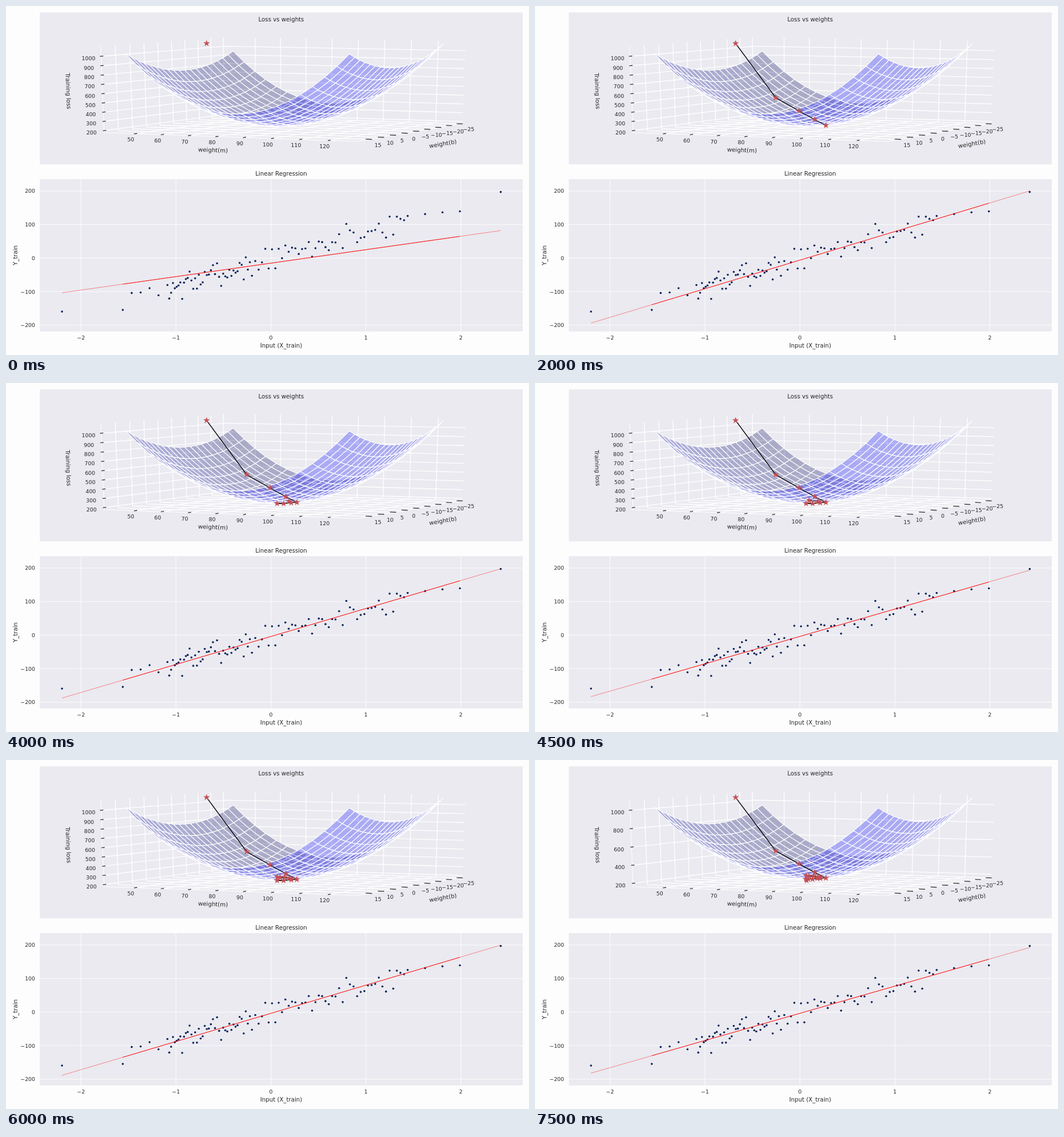
Write an HTML page that moves like this. It is 917 px wide and 611 px high and loops after 8000 ms.

```html
<!DOCTYPE html>
<html lang="en">
<head>
<meta charset="utf-8">
<title>Gradient descent</title>
<style>
  html, body { margin: 0; width: 100%; height: 100%; overflow: hidden; background: #fdfdfd; }
  svg { display: block; width: 917px; height: 611px; }
  text { font-family: "DejaVu Sans", Verdana, sans-serif; fill: #262626; }
</style>
</head>
<body>
<svg id="stage" viewBox="0 0 917 611"></svg>
<script>
const NS = 'http://www.w3.org/2000/svg';
const stage = document.getElementById('stage');
const STEP = 500, STEPS = 16;
const TITLE = 10.2, TICK = 9.35;
const PANEL = '#eaeaf0', INK = '#262626';

function add(parent, tag, attrs = {}) {
  const el = document.createElementNS(NS, tag);
  for (const k in attrs) el.setAttribute(k, attrs[k]);
  parent.appendChild(el);
  return el;
}
function label(parent, str, x, y, size, anchor = 'middle', angle = 0) {
  const el = add(parent, 'text', { 'font-size': size, 'text-anchor': anchor, y: size * 0.365,
    transform: `translate(${x} ${y}) rotate(${angle})` });
  el.textContent = String(str).replace('-', '\u2212');
}
const range = (a, b, d = 1) => Array.from({ length: Math.round((b - a) / d) + 1 }, (_, i) => a + i * d);
const pts = list => list.map(p => p.map(v => v.toFixed(2)).join(',')).join(' ');
const line = (parent, list, stroke, width) =>
  add(parent, 'polyline', { points: pts(list), fill: 'none', stroke, 'stroke-width': width });

// Camera: 25 degrees around, 10 degrees up, 10 units from a unit cube.
const AZ = 25 * Math.PI / 180, EL = 10 * Math.PI / 180;
const [ca, sa, ce, se] = [Math.cos(AZ), Math.sin(AZ), Math.cos(EL), Math.sin(EL)];
const depth = (b, m, z) => ce * (ca * b + sa * m) + se * z;
function project(b, m, z) {
  const d = 10 - depth(b, m, z);
  const right = -sa * b + ca * m;
  const up = -se * (ca * b + sa * m) + ce * z;
  return [494 + 4578 * right / d, 140.4 - 1437.8 * up / d];
}

const E = 0.5 + 1 / 48;                 // box edge
const HALF = 0.4545;                    // half width of the surface
const unitM = m => (m - 84.2) / 88;
const unitB = b => (b + 3) / 44;

// Bowl over v (slope) and w (intercept), both -1..1.
const bowl = (v, w) => -0.5 + 0.7135 * v * v + 0.2245 * w * w + 0.0474 * v + 0.0166 * w - 0.0244 * v * w;
function faceColour(v, w) {
  const zm = 22.3 * (1.427 * v + 0.0474 - 0.0244 * w);
  const zb = 44.6 * (0.449 * w + 0.0166 - 0.0244 * v);
  const s = (zm + zb + 0.5) / (1.5 * Math.hypot(zm, zb, 1));
  const k = Math.min(1, Math.max(0, (s + 0.94) / 1.88));
  return `rgb(0,0,${Math.round(255 * (0.35 + 0.65 * k))})`;
}

function drawScene(zTop, zSpan, zStep, squash) {
  const g = add(stage, 'g');
  const unitZ = z => 0.5 - (zTop - z) / zSpan;
  const path = (list, width = 1.35, stroke = '#fff') =>
    line(g, list.map(p => project(...p)), stroke, width);
  const ms = range(50, 120, 10), bs = range(-25, 15, 5), zs = range(200, 1000, zStep);
  const out = E + 0.1 / 12, inn = E - 0.2 / 12;

  ms.map(unitM).forEach(m => path([[E, m, -E], [-E, m, -E], [-E, m, E]]));
  bs.map(unitB).forEach(b => path([[b, E, -E], [b, -E, -E], [b, -E, E]]));
  zs.map(unitZ).forEach(z => path([[E, -E, z], [-E, -E, z], [-E, E, z]]));
  path([[E, -E, E], [E, -E, -E], [E, E, -E], [-E, E, -E]], 1.05);

  function mark(value, at, from, to, dx, dy) {
    const [x, y] = project(...at);
    path([from, to], 1.25, INK);
    label(g, value, x + dx, y + dy, TICK);
  }
  ms.forEach(v => {
    const m = unitM(v);
    mark(v, [E, m, -E], [out, m, -E], [inn, m, -E], -7.5, 10.3);
  });
  bs.forEach(v => {
    const b = unitB(v);
    mark(v, [b, E, -E], [b, out, -E], [b, inn, -E], 14.2, 9.7);
  });
  zs.forEach(v => {
    const z = unitZ(v);
    mark(v, [E, -E, z], [out, -E, z], [inn, -E, z], -22, 3.8);
  });

  const N = 19, faces = [];
  const at = i => 2 * i / N - 1;
  const corner = (i, j) => {
    const v = at(i), w = at(j);
    return [w * HALF, v * HALF, 0.5 - (0.5 - bowl(v, w)) * squash];
  };
  for (let i = 0; i < N; i++) for (let j = 0; j < N; j++) {
    const c = [corner(i, j), corner(i + 1, j), corner(i + 1, j + 1), corner(i, j + 1)];
    faces.push({
      points: pts(c.map(p => project(...p))),
      near: c.reduce((s, p) => s + depth(...p), 0),
      fill: faceColour(at(i + 0.5), at(j + 0.5))
    });
  }
  faces.sort((a, b) => a.near - b.near).forEach(f => add(g, 'polygon', {
    points: f.points, fill: f.fill, 'fill-opacity': 0.27,
    stroke: '#fff', 'stroke-width': 1.1, 'stroke-linejoin': 'round' }));
  return g;
}

// Upper chart
add(stage, 'rect', { x: 59.3, y: 11.3, width: 846.7, height: 266, fill: PANEL });
const scenes = [drawScene(1086.5, 891, 100, 1), drawScene(1087.5, 906, 200, 0.984)];
label(stage, 'Loss vs weights', 482.5, 23.5, TITLE);
label(stage, 'weight(m)', 363, 252, TITLE, 'middle', 2);
label(stage, 'weight(b)', 766, 241, TITLE, 'middle', -9.8);
label(stage, 'Training loss', 109.5, 149, TITLE, 'middle', 87.7);
const trail = add(stage, 'g');

// Lower chart
add(stage, 'rect', { x: 59.3, y: 303.2, width: 846.7, height: 266.5, fill: PANEL });
const px = x => 464.5 + 166.5 * x, py = y => 441.4 - 0.587 * y;
range(-2, 2).forEach(v => {
  line(stage, [[px(v), 303.2], [px(v), 569.7]], '#fff', 0.9);
  label(stage, v, px(v), 580.5, TICK);
});
range(-200, 200, 100).forEach(v => {
  line(stage, [[59.3, py(v)], [906, py(v)]], '#fff', 0.9);
  label(stage, v, 51, py(v), TICK, 'end');
});
label(stage, 'Linear Regression', 482.5, 293.7, TITLE);
label(stage, 'Input (X_train)', 482.5, 594, TITLE);
label(stage, 'Y_train', 16, 436.5, TITLE, 'middle', -90);

// Samples: inputs follow a few quantiles, outputs scatter around a line.
let seed = 7;
function random() {
  seed = (seed * 1664525 + 1013904223) % 4294967296;
  return seed / 4294967296;
}
const gauss = () => (random() + random() + random() + random() - 2) * Math.sqrt(3);
const quantiles = [[0, -2.2], [1, -1.56], [6, -1.09], [24, -0.74], [49, -0.2],
  [74, 0.68], [94, 1.44], [97, 1.99], [98, 2.42]];
function inputAt(i) {
  const n = Math.max(1, quantiles.findIndex(q => q[0] >= i));
  const [[i0, x0], [i1, x1]] = [quantiles[n - 1], quantiles[n]];
  return x0 + (x1 - x0) * (i - i0) / (i1 - i0);
}
range(0, 98).forEach(i => {
  const x = inputAt(i);
  add(stage, 'circle', { cx: px(x), cy: py(82 * x - 3 + 20 * gauss()), r: 1.8, fill: '#0a2259' });
});
const fitThin = line(stage, [], '#f00', 0.45);
const fitBold = line(stage, [], '#f00', 0.85);

// The fall into the bowl (star x, star y, slope), then a wobble around its bottom.
const fall = [[351.7, 65.5, 40.15], [422, 160.5, 58.2], [463, 183.7, 73.1], [490.5, 199, 79.3], [510, 209, 85.3]];
const wave = (k, peak, period) => Math.cos(2 * Math.PI * (k - peak) / period);
function stateAt(k) {
  if (k < fall.length) return fall[k];
  const swing = 13 * wave(k, 12.2, 4.9);
  return [488 + swing, 208 + 3.2 * wave(k, 14.5, 9), 82.5 + 0.12 * swing];
}
const interceptAt = k => -3.5 - 11.5 * 0.68 ** k;

function star(x, y) {
  const list = range(0, 9).map(i => {
    const r = i % 2 ? 1.9 : 5, a = i * Math.PI / 5;
    return [x + r * Math.sin(a), y - r * Math.cos(a)];
  });
  add(trail, 'polygon', { points: pts(list), fill: '#c44e52', stroke: '#c44e52', 'stroke-width': 0.8 });
}

function show(step) {
  const last = step === STEPS - 1;
  scenes[0].setAttribute('display', last ? 'none' : 'inline');
  scenes[1].setAttribute('display', last ? 'inline' : 'none');
  const top = fall[0][1];
  const stars = range(0, step).map(k => {
    const [x, y] = stateAt(k);
    return [x, last && k < step ? top + (y - top) * 0.984 : y];
  });
  trail.replaceChildren();
  line(trail, stars, '#000', 1.3);
  stars.forEach(p => star(...p));

  const slope = stateAt(step)[2], intercept = interceptAt(step);
  const on = x => [px(x), py(slope * x + intercept)];
  fitThin.setAttribute('points', pts([on(-2.2), on(2.42)]));
  fitBold.setAttribute('points', pts([on(-1.56), on(1.99)]));
}

let shown = -1;
const start = performance.now();
function frame(now) {
  const step = Math.floor(Math.max(0, now - start) / STEP) % STEPS;
  if (step !== shown) show(shown = step);
  requestAnimationFrame(frame);
}
show(shown = 0);
requestAnimationFrame(frame);
</script>
</body>
</html>
```
